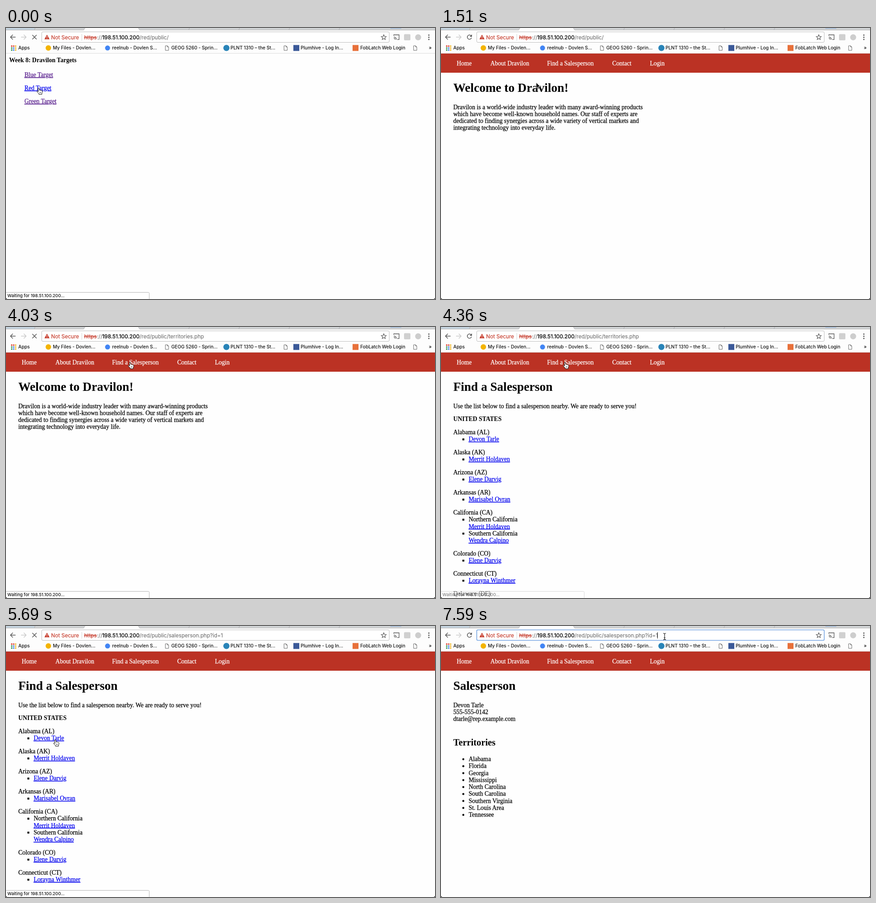
Animation of 942 by 594 pixels, one loop 8000 ms. Source, as an HTML page:

```html
<!DOCTYPE html>
<html lang="en">
<head>
<meta charset="utf-8">
<title>Browser session</title>
<style>
  html, body { margin: 0; width: 100%; height: 100%; overflow: hidden; background: #fefefe; }
  svg { display: block; width: 942px; height: 594px; }
  text { font-family: Inter, Roboto, sans-serif; color: #111; }
  text, tspan { fill: currentColor; stroke: currentColor; stroke-width: .15px; }
  .page text { font: 13.54px "Liberation Serif", "Times New Roman", serif; color: #000; stroke-width: .25px; }
  .page .b { font-weight: bold; stroke: none; }
  .page .h1 { font-size: 27.08px; font-weight: bold; stroke: none; }
  .page .h2 { font-size: 20.3px; font-weight: bold; stroke: none; }
  .page .nav { color: #fff; }
  .page .link { color: #00e; text-decoration: underline; }
  .page .seen { color: #551a8b; text-decoration: underline; }
  .mark text { font-size: 10.15px; font-weight: 500; stroke: none; }
  .bar { font-size: 11.6px; }
  .red { color: #c53929; }
  .gray { color: #757575; }
  .note { font-size: 9.4px; font-weight: 500; stroke: none; }
  .line { fill: none; stroke: #5a5a5a; stroke-width: 1.5; }
</style>
</head>
<body>
<svg viewBox="0 0 942 594">
  <rect width="942" height="594" fill="#fefefe"/>
  <g id="pages"></g>

  <rect width="942" height="56" fill="#fdfdfd"/>
  <rect width="942" height="5" fill="#d2d4d6"/>
  <rect width="62" height="4" fill="#c6d4e0"/>
  <rect x="844" width="24" height="1.5" fill="#9db9da"/>
  <path d="M0 4.5H170L174 0M290 0l4 4.5H942" fill="none" stroke="#b3b3b3"/>
  <path d="M171 5l3-5H290l3 5Z" fill="#fdfdfd"/>
  <path id="tabs" fill="none" stroke="#aeb0b2"/>
  <path d="M0 55.5H942" stroke="#dcdcdc"/>

  <path class="line" d="M21 20H10M15 14.8L9.8 20l5.2 5.2"/>
  <path class="line" d="M33 20H44M39 14.8l5.2 5.2-5.2 5.2" style="stroke:#cbcbcb"/>
  <path id="stop" class="line" d="M57.8 15.3l9.4 9.4M67.2 15.3l-9.4 9.4"/>
  <g id="reload">
    <path class="line" d="M66.3 17.3A4.7 4.7 0 1 0 67 21.4"/>
    <path d="M68 14v5.2h-5.2Z" fill="#5a5a5a"/>
  </g>

  <rect id="box" x="78.5" y="8.5" width="763" height="23" rx="2.5" fill="#fff"/>
  <rect id="pick" x="172" y="13" width="304" height="15" fill="#b5d5fb"/>
  <path d="M90 14.6l5.6 10.2H84.4Z" fill="#c53929"/>
  <path d="M90 18v3.4m0 1v1.3" stroke="#fff" stroke-width="1.2"/>
  <text class="bar red" x="99" y="24.7">Not Secure</text>
  <path d="M166.5 13V28" stroke="#d5d5d5"/>
  <text class="bar" y="24.7"><tspan class="red" x="171.5" text-decoration="line-through">https</tspan><tspan class="gray" x="200">://</tspan><tspan x="211.3" font-weight="500">198.51.100.200</tspan><tspan class="gray" id="path" x="293.3"></tspan></text>
  <path id="caret" d="M475.5 13.5V27.5" stroke="#222"/>

  <path id="star" class="line" style="stroke-width:1.2"/>
  <path class="line" style="stroke-width:1.3" d="M851.5 17V15h11.6v10.4H859M851.5 19.6a5.8 5.8 0 0 1 5.8 5.8M851.5 22.4a3 3 0 0 1 3 3"/>
  <rect x="874" y="13.5" width="14" height="13.5" rx="2" fill="#d0d0d0"/>
  <circle cx="905" cy="20.3" r="6.6" fill="#cdcdcd"/>
  <g fill="#5a5a5a"><circle cx="928.5" cy="15.4" r="1.5"/><circle cx="928.5" cy="20.2" r="1.5"/><circle cx="928.5" cy="25" r="1.5"/></g>

  <g id="marks" class="mark"></g>

  <g id="status">
    <rect x="-.5" y="579.5" width="315" height="16" rx="2" fill="#fff" stroke="#b4b4b4"/>
    <text id="note" class="note" x="3" y="590"></text>
  </g>
  <path d="M0 591.5V594H2.5ZM942 591.5V594H939.5Z" fill="#333"/>

  <g id="cursor">
    <g id="hand" fill="#fff" stroke="#111" stroke-linejoin="round">
      <path d="M-1.6 2Q-1.6.6-.3.6T1.1 2L1.8 5.4Q3 4.6 4 5.6Q5.2 5 6 6Q7.8 5.8 8 7.4Q8.2 10 7 12V14.4H.4V13L-3.4 9Q-4.4 7.2-3 7Q-2 7-.6 8.4Z"/>
      <path d="M2.4 9V12M4.3 9V12" stroke-width=".7"/>
    </g>
    <path id="arrow" fill="#000" stroke="#fff" stroke-width=".9" d="M0 0V12.4L2.9 9.8L4.9 14.4L7 13.5L5 9H9Z"/>
    <path id="beam" fill="none" stroke="#111" stroke-width="1.1" d="M-3-7Q0-7 0-5Q0-7 3-7M0-5.5V5.5M-3 7Q0 7 0 5Q0 7 3 7M-1.6 2.5H1.6"/>
  </g>
</svg>
<script>
const LOOP = 8000, LINE = 15.25;
const $ = id => document.getElementById(id);
const text = (x, y, s, cls = '') => `<text x="${x}" y="${y}" class="${cls}">${s}</text>`;
const lines = (x, y, list, cls) => list.map((s, i) => text(x, y + i * LINE, s, cls)).join('');

// Page contents
const nav = '<rect y="56" width="942" height="42" fill="#bb3224"/>' +
  [[34.5, 'Home'], [108.5, 'About Dravilon'], [233, 'Find a Salesperson'], [376, 'Contact'], [458.7, 'Login']]
    .map(([x, s]) => text(x, 82, s, 'nav')).join('');
const title = s => nav + text(27, 140, s, 'h1');

const targets = text(7, 74.5, 'Week 8: Dravilon Targets', 'b') +
  text(40.5, 107, 'Blue Target', 'seen') +
  text(40.5, 136, 'Red Target', 'link') +
  text(40.5, 165, 'Green Target', 'seen');

const welcome = title('Welcome to Dravilon!') + lines(27, 177.5, [
  'Dravilon is a world-wide industry leader with many award-winning products',
  'which have become well-known household names. Our staff of experts are',
  'dedicated to finding synergies across a wide variety of vertical markets and',
  'integrating technology into everyday life.']);

function stateList() {
  const states = [
    ['Alabama (AL)', '*Devon Tarle'],
    ['Alaska (AK)', '*Merrit Holdaven'],
    ['Arizona (AZ)', '*Elene Darvig'],
    ['Arkansas (AR)', '*Marisabel Ovran'],
    ['California (CA)', 'Northern California', '*Merrit Holdaven', 'Southern California', '*Wendra Calpino'],
    ['Colorado (CO)', '*Elene Darvig'],
    ['Connecticut (CT)', '*Lorayna Winthmer'],
    ['Delaware (DE)']];
  let y = 235, out = '';
  for (const [name, ...items] of states) {
    out += text(27, y, name);
    items.forEach((item, i) => {
      y += LINE;
      const link = item[0] === '*';
      if (!link || !i) out += `<rect x="47" y="${y - 6}" width="4.2" height="4.2"/>`;
      out += text(60.8, y, item.replace('*', ''), link ? 'link' : '');
    });
    y += 28.75;
  }
  return out;
}
const finder = title('Find a Salesperson') +
  text(27, 177.5, 'Use the list below to find a salesperson nearby. We are ready to serve you!') +
  text(27, 206, 'UNITED STATES', 'b') + stateList();

const areas = ['Alabama', 'Florida', 'Georgia', 'Mississippi', 'North Carolina',
  'South Carolina', 'Southern Virginia', 'St. Louis Area', 'Tennessee'];
const person = title('Salesperson') +
  lines(27, 177.5, ['Devon Tarle', '555-555-0142', 'dtarle@rep.example.com']) +
  text(27, 262, 'Territories', 'h2') + lines(60.8, 296, areas) +
  areas.map((_, i) => `<circle cx="49" cy="${292 + i * LINE}" r="2.2"/>`).join('');

$('pages').innerHTML = [targets, welcome, finder, person].map(p => `<g class="page">${p}</g>`).join('');
const pages = [...$('pages').children];

// Toolbar details
$('tabs').setAttribute('d', [62, 401, 511, 621, 731].map(x => `M${x + 2} 0l-2 4.5`).join(''));
$('star').setAttribute('d', 'M' + Array.from({ length: 10 }, (_, i) => {
  const a = i * Math.PI / 5, r = i % 2 ? 2.6 : 5.8;
  return `${(829.5 + r * Math.sin(a)).toFixed(2)} ${(20.6 - r * Math.cos(a)).toFixed(2)}`;
}).join('L') + 'Z');

const dot = (x, r, c) => `<circle cx="${x}" cy="43.8" r="${r}" fill="${c}"/>`;
const square = (x, c) => `<rect x="${x}" y="37.3" width="13" height="13" fill="${c}"/>`;
const sheet = x => `<path d="M${x} 39h4.4l2.6 2.6V49H${x}Zm4.4 0v2.6h2.6" fill="#fff" stroke="#666"/>`;
const hues = ['#e0483a', '#e0483a', '#f0b72f', '#3f9c57', '#4484ee', '#f0b72f', '#3f9c57', '#4484ee', '#f0b72f'];
const grid = hues.map((c, i) =>
  `<rect x="${11 + i % 3 * 4.3}" y="${38.2 + Math.floor(i / 3) * 4.3}" width="3" height="3" fill="${c}"/>`).join('');
$('marks').innerHTML = grid + dot(93, 6, '#f4b400') + dot(223, 5.5, '#4285f4') + sheet(350) +
  dot(484, 6.8, '#2984b8') + sheet(610.5) + square(631, '#3b5998') + square(761, '#e8703a') + sheet(895) +
  [[27, 'Apps'], [103, 'My Files - Dovlen...'], [233, 'reelnub - Dovlen S...'], [363, 'GEOG 5260 - Sprin...'],
   [493, 'PLNT 1310 – the St...'], [647, 'Plumhive - Log In...'], [778, 'FobLatch Web Login'], [928.5, '»']]
    .map(([x, s]) => text(x, 47.4, s)).join('');

// Timelines: the last row whose time has passed applies
const host = '198.51.100.200', root = '/red/public/';
const wait = `Waiting for ${host}...`;
const url = file => `https://${host}${root}${file}`;
const pageAt = [[0, 0], [450, 1], [4180, 2], [5840, 3]];
const busyAt = [[0, 1], [450, 0], [3440, 1], [4180, 0], [5540, 1], [5840, 0]];
const fileAt = [[0, ''], [3730, 'territories.php'], [5690, 'salesperson.php?id=1']];
const statusAt = [
  [0, wait, 1], [780, wait, .66], [920, wait, .33], [1060, '', 0],
  [2090, url('territories.php'), .5], [2240, url('territories.php'), 1],
  [3730, wait, 1], [4330, wait, .5], [4490, '', 0],
  [4950, url('salesperson.php?id=1'), .6], [5100, url('salesperson.php?id=1'), 1],
  [5540, wait, 1], [5840, wait, .5], [5980, '', 0]];
const focusAt = [[0, ''], [7000, 'pick'], [7450, 'none'], [7590, 'caret']];

// Pointer: time, hot spot, shape
const moves = [
  [0, 71.8, 131, 'hand'], [779, 71.8, 131, 'hand'], [780, 72, 131, 'beam'], [1060, 76, 131, 'beam'],
  [1210, 76, 131, 'beam'], [1360, 128, 127, 'arrow'], [1650, 290, 112, 'arrow'], [1940, 443, 92, 'arrow'],
  [2240, 276, 79, 'hand'], [2390, 266, 73.5, 'hand'], [2990, 272.4, 77, 'hand'], [4340, 272.4, 77, 'hand'],
  [4490, 232, 118, 'arrow'], [4800, 130, 232, 'arrow'], [4950, 108.3, 253, 'hand'], [5250, 108.3, 249, 'hand'],
  [5840, 108.3, 249, 'hand'], [5980, 200, 200, 'arrow'], [6270, 422, 88, 'arrow'],
  [6560, 474, 32, 'arrow'], [6710, 480, 28, 'beam'], [7150, 491, 23, 'beam'], [LOOP, 491, 23, 'beam']];

const last = (rows, t) => rows[rows.findLastIndex(r => r[0] <= t)];
const show = (el, on) => el.style.display = on ? '' : 'none';

function pointer(t) {
  const i = Math.min(moves.findLastIndex(m => m[0] <= t), moves.length - 2);
  const [t0, x0, y0, kind] = moves[i], [t1, x1, y1] = moves[i + 1];
  const steps = Math.max(1, Math.round((t1 - t0) / 148));
  const k = Math.floor((t - t0) / (t1 - t0) * steps + 1e-6) / steps;
  $('cursor').setAttribute('transform', `translate(${x0 + (x1 - x0) * k} ${y0 + (y1 - y0) * k})`);
  for (const id of ['hand', 'arrow', 'beam']) show($(id), id === kind);
}

function draw(t) {
  const page = last(pageAt, t)[1], busy = last(busyAt, t)[1], focus = last(focusAt, t)[1];
  pages.forEach((p, i) => show(p, i === page));
  show($('stop'), busy);
  show($('reload'), !busy);
  $('path').textContent = root + last(fileAt, t)[1];
  const [, note, alpha] = last(statusAt, t);
  $('note').textContent = note;
  $('status').style.opacity = alpha;
  $('box').setAttribute('stroke', focus ? '#74a4e2' : '#bdbdbd');
  $('box').setAttribute('stroke-width', focus ? 1.6 : 1);
  show($('pick'), focus === 'pick');
  show($('caret'), focus === 'caret');
  pointer(t);
}

function tick() {
  draw(performance.now() % LOOP);
  requestAnimationFrame(tick);
}
tick();
</script>
</body>
</html>
```
